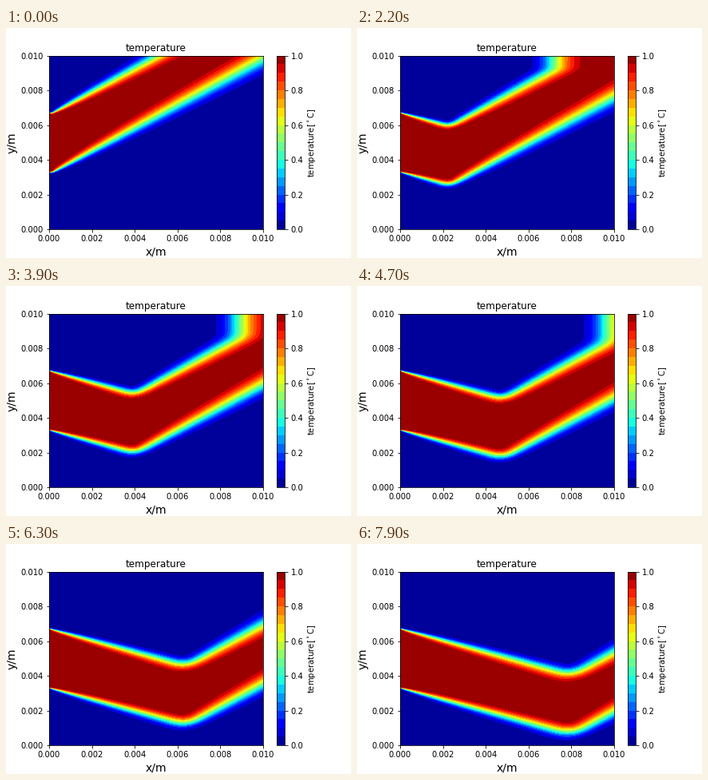
A matplotlib script for the animation above (8000 ms loop, 432x288 px).

```python
import matplotlib.pyplot as plt
import numpy as np
from matplotlib.animation import FuncAnimation

FRAMES, INTERVAL = 80, 100
SIZE = 0.01               # side of the square domain, m
N = 300                   # cells per side
H = SIZE / N
DT = 0.01                 # s
U = 0.001                 # m/s
V_OLD, V_NEW = U * 2 / 3, -U / 3
SUB = 10                  # solver steps per picture


def step(T, v):
    """One explicit upwind step of pure advection, in place."""
    cx, cy = U * DT / H, v * DT / H
    dx = T[:, 1:] - T[:, :-1]
    dy = np.diff(T[:, 1:], axis=0)
    T[:, 1:] -= cx * dx
    if v > 0:
        T[1:, 1:] -= cy * dy
    else:
        T[:-1, 1:] -= cy * dy
        T[-1, 1:] = T[-2, 1:]


def simulate():
    T = np.zeros((N + 1, N + 1))
    T[N // 3:2 * N // 3 + 1, 0] = 1
    for _ in range(1500):          # settle into the upward jet
        step(T, V_OLD)
    fields = []
    for _ in range(FRAMES):        # the flow then turns downward
        for _ in range(SUB):
            step(T, V_NEW)
        fields.append(np.clip(T[::2, ::2], 0, 1))
    return fields


fields = simulate()
axis = np.linspace(0, SIZE, N // 2 + 1)
levels = np.linspace(0, 1, 21)

plt.rcParams.update({"font.family": "DejaVu Sans", "font.size": 10})
fig = plt.figure(figsize=(6, 4), dpi=72)
fig.subplots_adjust(left=0.125, right=0.9, bottom=0.125, top=0.88)
ax = fig.add_subplot()


def contours(i):
    return ax.contourf(axis, axis, fields[i], levels, cmap="jet")


cs = contours(0)
bar = fig.colorbar(cs, ax=ax, ticks=np.linspace(0, 1, 6))
bar.set_label(r"temperature[$^\circ$C]")
ax.set_title("temperature", fontsize=12)
ax.set_xlabel("x/m", fontsize=14)
ax.set_ylabel("y/m", fontsize=14)
ax.set_xlim(0, SIZE)
ax.set_ylim(0, SIZE)


def update(i):
    global cs
    cs.remove()
    cs = contours(i)
    return [cs]


anim = FuncAnimation(fig, update, frames=FRAMES, interval=INTERVAL,
                     init_func=lambda: [], repeat=True, repeat_delay=0)
plt.show()
```
